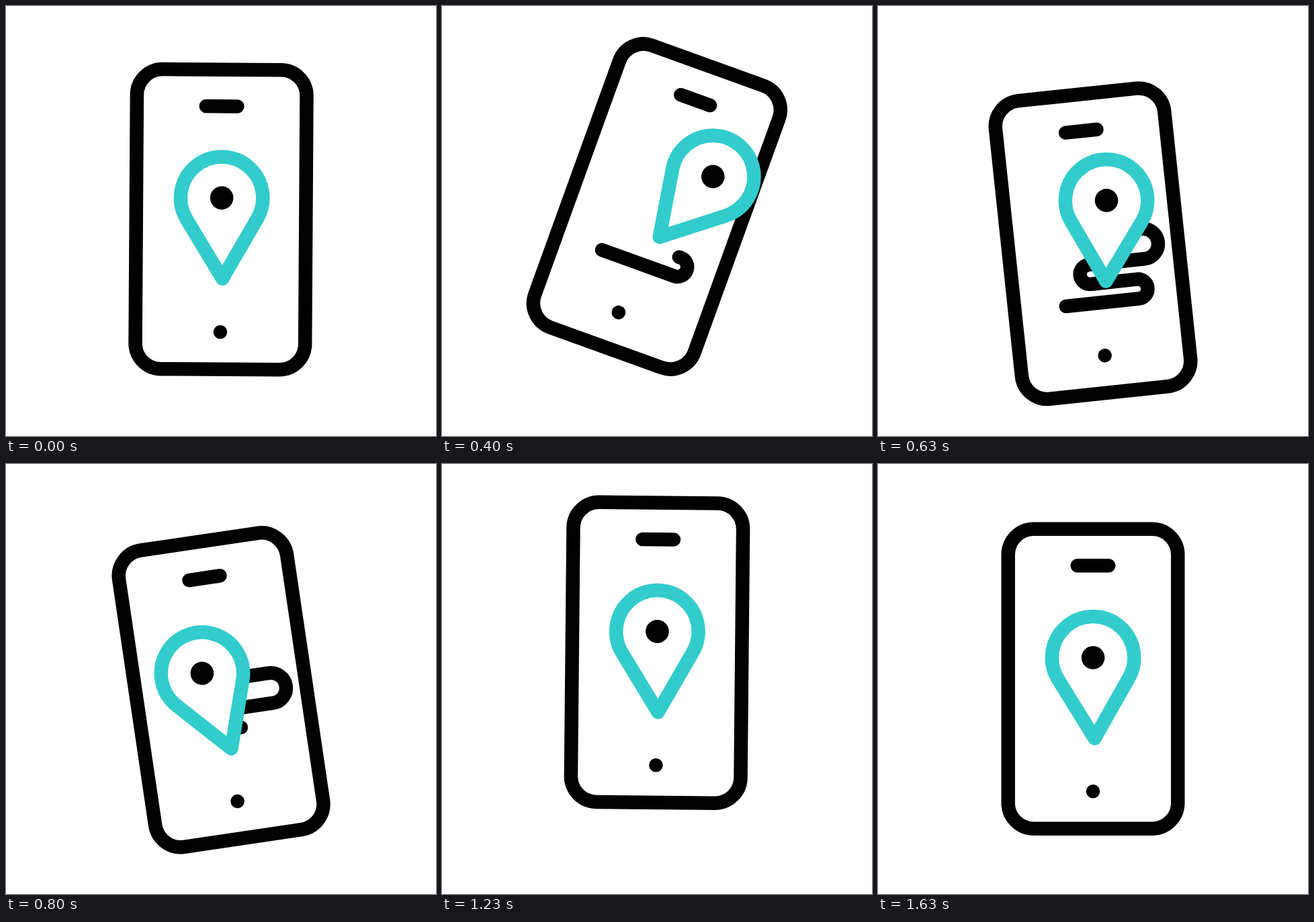
Recreate the animation shown at these times as an HTML page. Size 640x640 px, loop 1670 ms.

```html
<!DOCTYPE html>
<html lang="en">
<head>
<meta charset="utf-8">
<title>Phone navigation</title>
<style>
  html, body { margin: 0; width: 100%; height: 100%; overflow: hidden; background: #fff; }
  svg { display: block; width: 100vw; height: 100vh; }
  .line { fill: none; stroke: #000; stroke-width: 20.5; stroke-linecap: round; stroke-linejoin: round; }
  .pin { fill: #fff; stroke: #3cc; }
</style>
</head>
<body>
<svg viewBox="0 0 640 640">
  <g id="phone">
    <rect class="line" x="-126.3" y="-222.6" width="252.6" height="446.1" rx="38.2"/>
    <path class="line" d="M-23.3 -168H23.3"/>
    <circle cy="168" r="10.3"/>
    <path id="route" class="line" pathLength="1"
      d="M-55 89H59.5A14.5 14.5 0 0 0 59.5 60H-9.7A14.5 14.5 0 0 1 -9.7 31H74A22.5 22.5 0 0 0 74 -14H10"/>
    <g id="pin">
      <path class="line pin" d="M0 0L-52.7 -89A61.2 61.2 0 1 1 52.7 -89Z"/>
      <circle cy="-120.2" r="17.3"/>
    </g>
  </g>
</svg>
<script>
const LOOP = 1670;
const FRAME = 100 / 3;
const LAST_FRAME = 49;

// Each key: time in ms, value, strength of the ease that leads to it.
const SMOOTH = 1 / 3;
const tracks = {
  lift: [[0, 0], [267, -47.5, SMOOTH], [675, 34, .5], [1142, -42, .45], [1667, 0, .6]],
  tilt: [[0, 0], [417, 20, SMOOTH], [755, -10, .45], [1067, 5, .5], [1325, 0, .4]],
  hop: [[0, 0], [533, 1, SMOOTH], [840, 0, SMOOTH]],
  swing: [[0, 0], [533, 25, SMOOTH], [810, -12, SMOOTH], [1067, 0, SMOOTH]],
  routeEnd: [[262, 0], [707, 1, SMOOTH]],
  routeStart: [[640, 0], [1085, 1, SMOOTH]]
};

const [phone, route, pin] = ['phone', 'route', 'pin'].map(id => document.getElementById(id));

// Cubic Bezier (strength, 0, 1 - strength, 1), solved by bisection.
function ease(x, strength) {
  let low = 0, high = 1, s = .5;
  for (let i = 0; i < 24; i++) {
    s = (low + high) / 2;
    const guess = 3 * s * (1 - s) * ((1 - s) * strength + s * (1 - strength)) + s ** 3;
    if (guess < x) low = s; else high = s;
  }
  return s * s * (3 - 2 * s);
}

function valueAt(keys, time) {
  if (time <= keys[0][0]) return keys[0][1];
  const next = keys.findIndex(key => key[0] > time);
  if (next < 0) return keys[keys.length - 1][1];
  const [t0, v0] = keys[next - 1];
  const [t1, v1, strength] = keys[next];
  return v0 + (v1 - v0) * ease((time - t0) / (t1 - t0), strength);
}

function draw(now) {
  // The motion is stepped at 30 frames per second.
  const frame = Math.min(LAST_FRAME, Math.floor((now % LOOP) / FRAME + .21));
  const time = (frame + 1) * FRAME;
  const at = name => valueAt(tracks[name], time);

  phone.setAttribute('transform', `translate(320 ${319.3 + at('lift')}) rotate(${at('tilt')})`);

  const hop = at('hop');
  pin.setAttribute('transform',
    `translate(${2.4 + 18.3 * hop} ${89.1 - 52 * hop}) rotate(${at('swing') - 1.1})`);

  const start = at('routeStart');
  const length = at('routeEnd') - start;
  route.style.visibility = length > .001 ? 'visible' : 'hidden';
  route.setAttribute('stroke-dasharray', `${Math.max(length, 0)} 2`);
  route.setAttribute('stroke-dashoffset', -start);
}

const begin = performance.now();
function tick() {
  draw(performance.now() - begin);
  requestAnimationFrame(tick);
}
tick();
</script>
</body>
</html>
```
